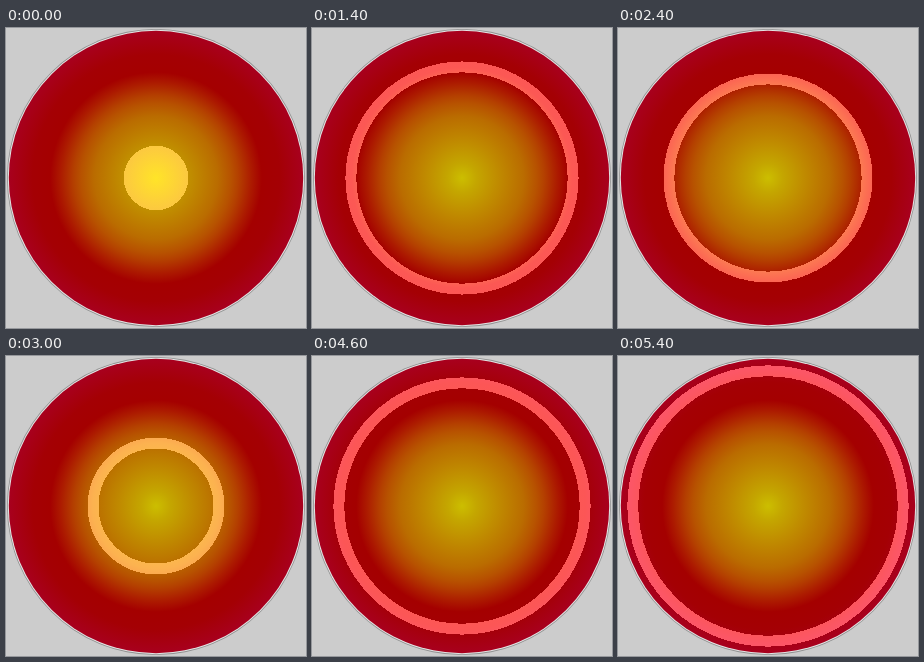
Write an HTML page that moves like this. It is 300 by 300 pixels and loops after 5.6 s.

```html
<!DOCTYPE html>
<html lang="en">
<head>
<meta charset="utf-8">
<title>Pulsing rings</title>
<style>
  html, body { margin: 0; width: 100%; height: 100%; overflow: hidden; background: #ccc; }
  svg { display: block; width: 300px; height: 300px; }
</style>
</head>
<body>
<svg viewBox="-150 -150 300 300">
  <defs>
    <radialGradient id="dim" gradientUnits="userSpaceOnUse" cx="0" cy="0" r="147">
      <stop offset="0" stop-color="#ccbe00"/>
      <stop offset=".1" stop-color="#c4a600"/>
      <stop offset=".24" stop-color="#c08c00"/>
      <stop offset=".42" stop-color="#ba6c00"/>
      <stop offset=".51" stop-color="#b75200"/>
      <stop offset=".56" stop-color="#b44000"/>
      <stop offset=".65" stop-color="#ac1a00"/>
      <stop offset=".72" stop-color="#a40000"/>
      <stop offset=".84" stop-color="#a40004"/>
      <stop offset="1" stop-color="#a8001e"/>
    </radialGradient>
    <radialGradient id="lit" gradientUnits="userSpaceOnUse" cx="0" cy="0" r="147">
      <stop offset="0" stop-color="#ffe428"/>
      <stop offset=".22" stop-color="#fcc840"/>
      <stop offset=".43" stop-color="#fcb250"/>
      <stop offset=".51" stop-color="#fca050"/>
      <stop offset=".75" stop-color="#fc5854"/>
      <stop offset=".84" stop-color="#fc5656"/>
      <stop offset=".94" stop-color="#fc5666"/>
    </radialGradient>
  </defs>
  <circle r="149" fill="#909090"/>
  <circle r="148.2" fill="#e4e4e4"/>
  <circle r="147.2" fill="url(#dim)"/>
  <circle id="ring" fill="none" stroke="url(#lit)" shape-rendering="crispEdges"/>
</svg>
<script>
const STEP = 200, CORE = 32.2, SPACING = 12.05, WIDTH = 10.9;
// Sweep out and back with a short hold, then skip outward by twos.
const levels = '0123456789876543321024683579';
const ring = document.getElementById('ring');

function draw(now) {
  const level = +levels[Math.floor(now / STEP) % levels.length];
  const outer = CORE + level * SPACING;
  const width = level ? WIDTH : CORE;
  ring.setAttribute('r', outer - width / 2);
  ring.setAttribute('stroke-width', width);
}

const start = performance.now();
function tick() {
  draw(performance.now() - start);
  requestAnimationFrame(tick);
}
draw(0);
requestAnimationFrame(tick);
</script>
</body>
</html>
```
